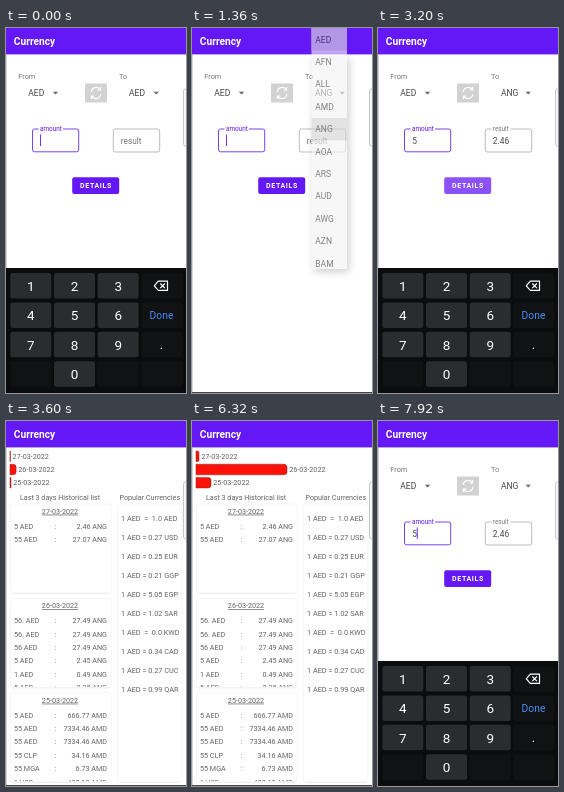
These frames come from a looping animation (180 by 365 pixels, 8000 ms). An HTML page:

```html
<!DOCTYPE html>
<html lang="en">
<head>
<meta charset="utf-8">
<title>Currency</title>
<style>
html, body { margin: 0; width: 100%; height: 100%; overflow: hidden; background: #fff; }
svg { display: block; width: 100%; height: 100%; font-family: Roboto, "Open Sans", sans-serif; }
text { white-space: pre; }
</style>
</head>
<body>
<svg id="stage" viewBox="0 0 180 365"></svg>
<script>
const PURPLE = '#6418f6', GREY = '#626262';

const text = (x, y, s, size = 7.2, fill = GREY, more = '') =>
  `<text x="${x}" y="${y}" font-size="${size}" fill="${fill}" ${more}>${s}</text>`;
const rect = (x, y, w, h, fill, more = '') =>
  `<rect x="${x}" y="${y}" width="${w}" height="${h}" fill="${fill}" ${more}/>`;
const group = (id, body) => `<g id="${id}">${body}</g>`;
const MID = 'text-anchor="middle"', END = 'text-anchor="end"';

// Converter screen
const spinner = (x, label, id) =>
  text(x, 51, label, 7.3, '#777') +
  text(x + 10, 68, 'AED', 8.5, '#444', `id="${id}"`) +
  `<path d="M${x + 34.5} 63.8h5.4l-2.7 2.7z" fill="#666"/>`;

function converter() {
  return rect(0, 26, 180, 339, '#fff') +
    spinner(12.3, 'From', 'from') + spinner(113, 'To', 'to') +
    rect(79, 55.5, 22, 19, '#d2d2d2') +
    `<path d="M85.2 64a5 5 0 0 1 9-2.6M94.8 66a5 5 0 0 1-9 2.6M94.6 59v3h-3M85.4 71v-3h3"
      fill="none" stroke="#fff" stroke-width="1.2"/>` +
    rect(26.5, 101, 46.2, 22.8, 'none', 'rx="2" stroke="#7444f0"') +
    rect(32.5, 99, 24.5, 4, '#fff') +
    text(34, 103.2, 'amount', 6.4, PURPLE) +
    text(34.2, 115.5, '', 8.4, '#444', 'id="amount"') +
    rect(34, 106.5, .9, 11.5, PURPLE, 'id="caret"') +
    rect(107.3, 101, 46.4, 23, 'none', 'rx="2" stroke="#aaa" stroke-width=".8"') +
    rect(113.5, 99, 19, 4, '#fff', 'id="gap"') +
    text(114.8, 115.5, 'result', 8.3, '#777', 'id="label"') +
    text(114.8, 115.5, '2.46', 8.4, '#444', 'id="result"') +
    rect(66.2, 149.2, 47, 16.8, PURPLE, 'rx="2" id="button"') +
    text(90, 160.2, 'DETAILS', 7, '#fff', MID + ' font-weight="700" letter-spacing=".65"');
}

// Number pad
function keyboard() {
  const rows = ['123', '456', '789', ' 0 '];
  let s = rect(0, 240, 180, 126, '#0b0c0e');
  rows.forEach((row, r) => {
    const y = 245 + r * 29.4;
    [...row, ' '].forEach((k, c) => {
      const x = 4.3 + c * 43.7, blank = k === ' ';
      s += rect(x, y, 41, 25.5, blank ? '#111214' : '#2b2c2f', `rx="2.5"` + (blank ? '' : ` id="key${k}"`)) +
        text(x + 20.5, y + 17.7, k, 13.5, '#fff', MID);
    });
  });
  return s + text(155.5, 291, 'Done', 10.3, '#4b8cf7', MID) +
    text(155.5, 321, '.', 13, '#fff', MID) +
    `<path d="M148.3 257.8l4-4.6h9.2v9.2h-9.2zM154.3 255.5l4.6 4.6m0-4.6l-4.6 4.6"
      fill="none" stroke="#fff" stroke-width="1.2" stroke-linejoin="round"/>`;
}

// Drop-down list
function popup() {
  const codes = 'AED AFN ALL AMD ANG AOA ARS AUD AWG AZN BAM'.split(' ');
  return rect(122, 30, 35, 214, '#000', 'opacity=".3" filter="url(#blur)"') +
    rect(119.5, 0, 35.5, 241, '#f4f4f4') +
    rect(119.5, 0, 35.5, 22.5, '#dedede') +
    rect(119.5, 90, 35.5, 22.4, '#d4d4d4', 'id="picked"') +
    codes.map((c, i) => text(123.3, 14.6 + i * 22.4, c, 8.5, '#3c3c3c')).join('');
}

// Details screen
const DAYS = [
  ['27-03-2022', 83, ['5 AED|2.46 ANG', '55 AED|27.07 ANG']],
  ['26-03-2022', 177.5, ['56. AED|27.49 ANG', '56. AED|27.49 ANG', '56 AED|27.49 ANG',
    '5 AED|2.45 ANG', '1 AED|0.49 ANG', '5 AED|2.35 ANG']],
  ['25-03-2022', 272, ['5 AED|666.77 AMD', '55 AED|7334.46 AMD', '55 AED|7334.46 AMD',
    '55 CLP|34.16 AMD', '55 MGA|6.73 AMD', '1 USD|487.12 AMD']]
];
const RATES = [' =  1.0 AED', '= 0.27 USD', '= 0.25 EUR', '= 0.21 GGP', '= 5.05 EGP',
  '= 1.02 SAR', ' =  0.0 KWD', '= 0.34 CAD', '= 0.27 CUC', '= 0.99 QAR'];
const BARS = [3, 91, 15];

const card = (x, y, w, h) =>
  rect(x, y, w, h, '#fff', 'rx="2" stroke="#f3f3f3" stroke-width=".8"') +
  `<path d="M${x + 2} ${y + h + .6}h${w - 4}" stroke="#eaeaea" stroke-width=".8"/>`;

function details() {
  let s = rect(0, 26, 180, 339, '#fff');
  BARS.forEach((b, i) => {
    s += `<path id="bar${i}" fill="#fc1208" stroke="#802020" stroke-width=".5"/>` +
      text(0, 38 + i * 13.2, DAYS[i][0], 7.2, GREY, `id="date${i}"`);
  });
  s += text(54, 79.2, 'Last 3 days Historical list', 7.2, GREY, MID) +
    text(113.4, 79.2, 'Popular Currencies') + card(111.5, 83, 64.5, 278);
  RATES.forEach((r, i) => s += text(115, 100.4 + i * 18.9, '1 AED ' + r, 7.3));
  DAYS.forEach(([date, y, rows], i) => {
    s += card(4.5, y, 100.5, 89) +
      text(54, y + 9.6, date, 7.2, GREY, MID + ' text-decoration="underline"') +
      `<clipPath id="clip${i}"><rect x="4" y="${y}" width="102" height="88.3"/></clipPath><g clip-path="url(#clip${i})">`;
    rows.forEach((row, j) => {
      const [a, b] = row.split('|'), ty = y + 24.6 + j * 13.4;
      s += text(8, ty, a) + text(48.5, ty, ':') + text(101, ty, b, 7.2, GREY, END);
    });
    s += '</g>';
  });
  return s;
}

const stage = document.getElementById('stage');
stage.innerHTML = '<filter id="blur" x="-50%" width="200%"><feGaussianBlur stdDeviation="4"/></filter>' +
  converter() + group('details', details()) +
  rect(0, 0, 180, 26.4, PURPLE) +
  text(7.8, 17, 'Currency', 10.2, '#fff', 'font-weight="600"') +
  '<path d="M.3 26V365" stroke="#aaa" stroke-width=".6"/><path d="M0 364.5H180" stroke="#444"/>' +
  '<rect x="177.5" y="61" width="8" height="57" rx="2" fill="#f6f6f6" stroke="#bbb" stroke-width=".8"/>' +
  group('keyboard', keyboard()) + group('popup', popup());

const el = {};
stage.querySelectorAll('[id]').forEach(e => el[e.id] = e);
const set = (id, attrs) => { for (const k in attrs) el[id].setAttribute(k, attrs[k]); };

const ramp = (t, a, b) => Math.max(0, Math.min(1, (t - a) / (b - a)));
const ease = (t, a, b) => { const p = ramp(t, a, b); return p * p * (3 - 2 * p); };

const TYPED = 2640, BACK = 7080, REFOCUS = 7480;

function draw(t) {
  // keyboard slides away and returns
  const up = 1 - ease(t, 960, 1140) + ease(t, 1800, 2020) - ease(t, 3300, 3460) + ease(t, REFOCUS, 7680);
  set('keyboard', { transform: `translate(0 ${(1 - up) * 126})` });
  set('key5', { fill: t >= TYPED - 60 && t < TYPED + 80 ? '#55565a' : '#2b2c2f' });

  set('popup', { opacity: ramp(t, 760, 880) - ramp(t, 1290, 1490) });
  set('picked', { opacity: ramp(t, 1200, 1260) });
  el.to.textContent = t < 1290 ? 'AED' : 'ANG';

  const typed = t >= TYPED, p = ease(t, TYPED, TYPED + 160);
  const focus = t >= REFOCUS ? REFOCUS : typed ? TYPED : 0;
  el.amount.textContent = typed ? '5' : '';
  set('caret', { x: typed ? 38.8 : 34, opacity: (t - focus) % 1000 < 500 ? 1 : 0 });
  set('label', { y: 115.5 - 12.3 * p, 'font-size': 8.3 - 1.9 * p });
  set('gap', { opacity: p });
  set('result', { opacity: p });
  set('button', { fill: t >= 3200 && t < 3360 ? '#8a52f8' : PURPLE });

  // details screen fades in and out with a short slide
  const shown = ease(t, 3340, 3520) - ease(t, BACK, BACK + 180);
  set('details', { opacity: shown, transform: `translate(0 ${(1 - shown) * 18})` });
  const grow = ramp(t, 3500, 5000);
  BARS.forEach((full, i) => {
    const w = Math.max(.4, full * grow), y = 30 + i * 13.2, r = Math.min(3, w / 2);
    set('bar' + i, { d: `M4 ${y}h${w - r}q${r} 0 ${r} ${r}v${10.6 - 2 * r}q0 ${r} ${-r} ${r}h${r - w}z` });
    set('date' + i, { x: 6.2 + w });
  });
}

function frame() {
  draw(performance.now() % 8000);
  requestAnimationFrame(frame);
}
frame();
</script>
</body>
</html>
```
